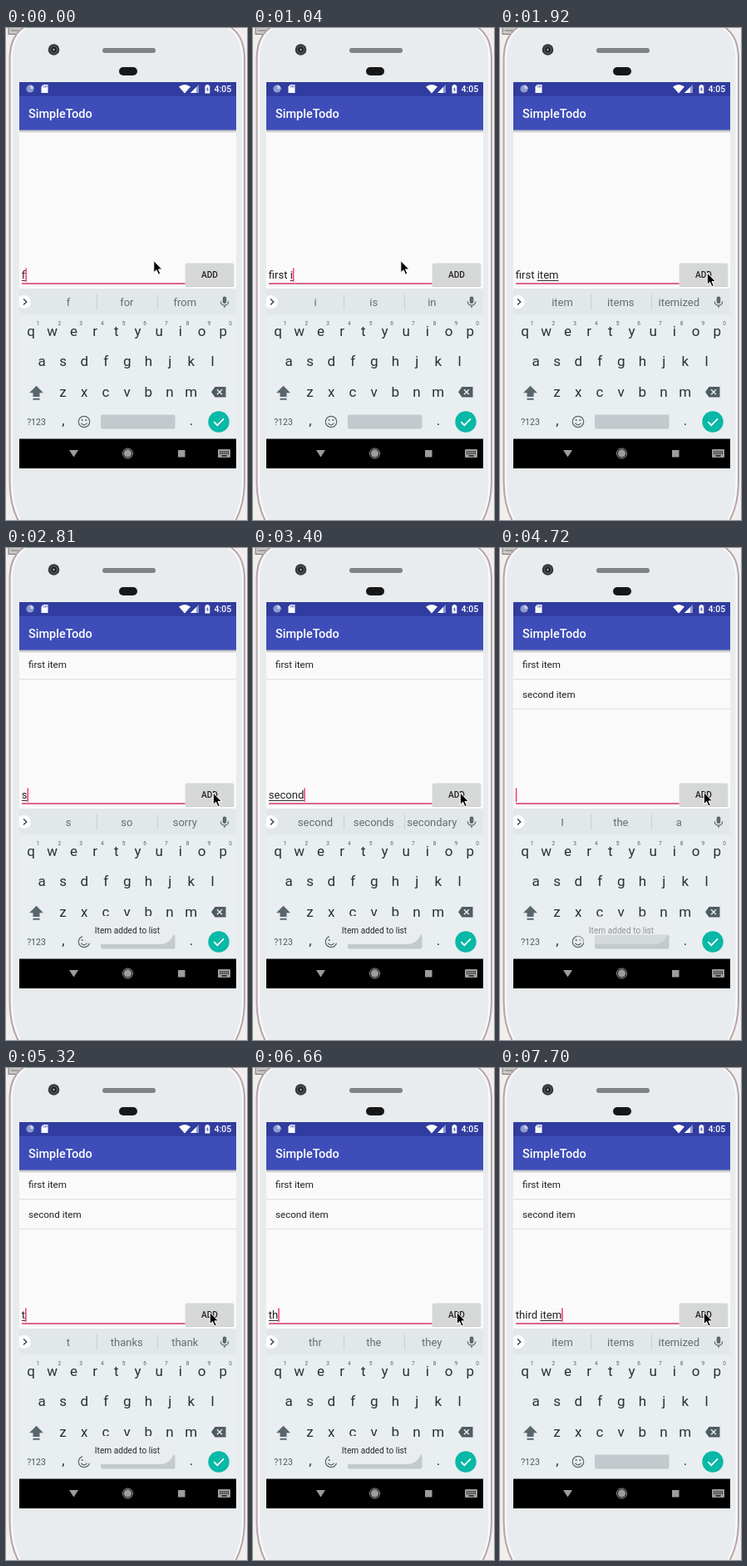
Recreate the animation shown at these times as an HTML page. Size 290 by 591 pixels, loop 7990 ms.

```html
<!DOCTYPE html>
<html lang="en">
<head>
<meta charset="utf-8">
<title>Todo list demo</title>
<style>
  html, body { margin: 0; width: 100%; height: 100%; overflow: hidden; background: #f3eeee; }
  svg { display: block; width: 290px; height: 591px; font-family: Roboto, sans-serif; }
  text { white-space: pre; }
  .mid { text-anchor: middle; }
  .key { font-size: 17px; fill: #263238; }
  .hint { font-size: 6.6px; fill: #56646b; }
  .sug { font-size: 13px; fill: #636e73; }
  .item { font-size: 11.6px; fill: #212121; }
</style>
</head>
<body>
<svg viewBox="0 0 290 591">
  <defs>
    <linearGradient id="shade" x1="0" y1="0" x2="0" y2="1">
      <stop offset="0" stop-color="#000" stop-opacity=".28"/>
      <stop offset="1" stop-color="#000" stop-opacity="0"/>
    </linearGradient>
  </defs>

  <!-- desktop and phone body -->
  <rect x="3" y="0" width="16" height="7.5" fill="#c9c6c6"/>
  <path d="M3 0V7.500H19V0M6 3H16" fill="none" stroke="#777272"/>
  <path d="M25.500 0V4" stroke="#5d4444" stroke-width="2"/>
  <path id="body" d="M25-3C13 4 5 14 4.500 36V545C4.500 566 8 580 16 594H275C283 580 287 566 287 545V36C286.500 14 279 4 267-3Z"
    fill="#e9ecee" stroke="#b5a5a8" stroke-width="2"/>
  <path d="M27-2C15 5 7.500 15 7 37V545C7 566 11 580 18 593M265-2C277 5 284 15 284.500 37V545C284.500 566 281 580 273 593"
    fill="none" stroke="#f8f8f9" stroke-width="2"/>
  <circle cx="57.500" cy="26" r="6.800" fill="#35383b"/>
  <circle cx="57.500" cy="26" r="4" fill="#191b1e" stroke="#666a6d"/>
  <circle cx="57.500" cy="26" r="1.500" fill="#8b9196"/>
  <rect x="116" y="24" width="64" height="6" rx="3" fill="#818385"/>
  <rect x="136" y="47" width="22" height="10" rx="5" fill="#171718"/>

  <!-- app -->
  <rect x="16" y="65" width="261" height="464" fill="#fafafa"/>
  <rect x="16" y="122.500" width="261" height="4" fill="url(#shade)"/>
  <rect x="16" y="65" width="261" height="17" fill="#303c9f"/>
  <rect x="16" y="82" width="261" height="40.600" fill="#3e4db8"/>
  <circle cx="29" cy="73" r="4.600" fill="#8f9bd0"/>
  <path d="M29 68.400A4.600 4.600 0 0 1 33.600 73H29Z" fill="#c3caea"/>
  <path d="M45 68H50.500V78H42.500V70.500Z" fill="#fff"/>
  <path d="M45.700 69V71.500M47.400 69V71.500M49 69V71.500" stroke="#303c9f" stroke-width=".7"/>
  <path d="M208 70.500Q215 65.500 222 70.500L215 78.500Z" fill="#fff"/>
  <path d="M232 68V78H222Z" fill="#8d97d0"/>
  <path d="M229 71V78H222Z" fill="#fff"/>
  <path d="M239.500 69.300H241V68H243.800V69.300H245.300V78.500H239.500Z" fill="#fff"/>
  <path d="M242.800 70.500L241 74H242.400V77L244 73.400H242.600Z" fill="#303c9f"/>
  <text x="250.500" y="77" font-size="10.600" font-weight="500" fill="#fff">4:05</text>
  <text x="27" y="108" font-size="14.500" font-weight="500" fill="#fff">SimpleTodo</text>

  <g id="row1" class="item">
    <text x="27" y="144.300">first item</text>
    <path d="M16 157.500H277" stroke="#dedede"/>
  </g>
  <g id="row2" class="item">
    <text x="27" y="179.800">second item</text>
    <path d="M16 193.300H277" stroke="#dedede"/>
  </g>

  <path d="M19 307H215.500" stroke="#d3326b" stroke-width="1.500"/>
  <text id="field" x="18.800" y="301.300" font-size="13.050" fill="#212121"></text>
  <rect id="line" y="303" height="1" fill="#333"/>
  <rect id="caret" y="288.500" width="1.500" height="16.500" fill="#f0377a"/>
  <rect x="215.700" y="283.500" width="58.600" height="27.500" rx="1.500" fill="#000" opacity=".18"/>
  <rect id="button" x="216" y="282.500" width="58" height="27.500" rx="1.500" fill="#d6d7d7"/>
  <text class="mid" x="245" y="300" font-size="10.150" font-weight="500" fill="#222">ADD</text>

  <!-- keyboard -->
  <rect x="16" y="313" width="261" height="181" fill="#e9eef0"/>
  <rect x="16" y="313" width="261" height="32" fill="#e2e7e9"/>
  <path d="M109.500 320V338M182.500 320V338" stroke="#cbd1d4"/>
  <path d="M16 323.400A8 8 0 1 1 16 334.600Z" fill="#fff"/>
  <path d="M21 325.500L24.700 329L21 332.500" fill="none" stroke="#37474f" stroke-width="1.500"/>
  <g id="sugs"></g>
  <rect x="260.700" y="322.500" width="4.600" height="8.500" rx="2.300" fill="#5b686e"/>
  <path d="M258.300 328.500A4.700 4.700 0 0 0 267.700 328.500M263 333V336" fill="none" stroke="#5b686e" stroke-width="1.300"/>
  <g id="keys"></g>
  <path d="M36.500 429.800L45 438.300H40.500V443H32.500V438.300H28Z M32.500 444.800H40.500V446.800H32.500Z" fill="#59676d"/>
  <path d="M251.500 431H264.500V443.500H251.500L247 437.250Z" fill="#4f5d63"/>
  <path d="M254 434.200L260 440.300M260 434.200L254 440.300" stroke="#e9eef0" stroke-width="1.400"/>
  <text class="mid" x="36.500" y="477" font-size="10.500" fill="#4c5a60">?123</text>
  <g fill="none" stroke="#59676d" stroke-width="1.200">
    <circle cx="94" cy="473" r="6.700"/>
    <path d="M90.500 474.700Q94 479 97.500 474.700"/>
  </g>
  <circle cx="91.700" cy="471" r="1.100" fill="#59676d"/>
  <circle cx="96.300" cy="471" r="1.100" fill="#59676d"/>
  <rect x="114" y="464.500" width="89.500" height="17" rx="2" fill="#c3c9cc"/>
  <circle cx="256" cy="473" r="12.700" fill="#09b8a6"/>
  <path d="M250.300 473.200L254.300 477.200L262 469.300" fill="none" stroke="#fff" stroke-width="1.800"/>

  <!-- navigation bar -->
  <rect x="16" y="493.500" width="261" height="35.500" fill="#000"/>
  <g fill="#9c9c9c">
    <path d="M76 507H87L81.500 515.500Z"/>
    <circle cx="146.500" cy="511" r="4.700"/>
    <circle cx="146.500" cy="511" r="6" fill="none" stroke="#9c9c9c"/>
    <rect x="207" y="507" width="8.500" height="8.500"/>
    <rect x="255" y="506" width="15" height="10" rx="1"/>
    <path d="M257 508.800H268.500M257 511.200H268.500" stroke="#000" stroke-width="1.200" stroke-dasharray="1.300 1.100"/>
    <path d="M259.500 513.900H265.500" stroke="#000" stroke-width="1.200"/>
  </g>

  <g id="toast">
    <rect x="90" y="442" width="112.500" height="34" rx="17" fill="#e9edee"/>
    <text class="mid" x="146" y="462.700" font-size="10.150" fill="#262b2d">Item added to list</text>
  </g>

  <path id="mouse" d="M0 0V14.200L3.300 11.200L5.600 16.600L8 15.600L5.700 10.400H10.200Z"
    fill="#000" stroke="#fff" stroke-width="1" stroke-linejoin="round"/>
</svg>
<script>
const LOOP = 7990;
const $ = id => document.getElementById(id);

function addText(parent, cls, x, y, str = '') {
  const el = document.createElementNS('http://www.w3.org/2000/svg', 'text');
  el.setAttribute('class', 'mid ' + cls);
  el.setAttribute('x', x);
  el.setAttribute('y', y);
  el.textContent = str;
  return parent.appendChild(el);
}

const PITCH = 25.7;
[['qwertyuiop', 30, 369.5], ['asdfghjkl', 43, 405.5], ['zxcvbnm', 68.5, 442.5]].forEach(([row, x0, y], r) => {
  [...row].forEach((ch, i) => {
    const x = x0 + i * PITCH;
    addText($('keys'), 'key', x, y, ch);
    if (!r) addText($('keys'), 'hint', x + 8.7, 357, (i + 1) % 10);
  });
});
addText($('keys'), 'key', 69, 477, ',');
addText($('keys'), 'key', 223, 477, '.');
const sugs = [75, 145.3, 215.3].map(x => addText($('sugs'), 'sug', x, 334));

// time, field text, suggestions
const typing = [
  [0, 'f', 'f for from'],
  [150, 'fi', 'fi first fine'],
  [300, 'fir', 'fir first fire'],
  [440, 'first', 'first firsts First'],
  [740, 'first ', 'time one of'],
  [1040, 'first i', 'i is in'],
  [1190, 'first it', 'it is its'],
  [1340, 'first item', 'item items itemized'],
  [2220, '', 'I the a'],
  [2660, 's', 's so sorry'],
  [2960, 'se', 'se see send'],
  [3100, 'sec', 'sec second secret'],
  [3250, 'secon', 'secon second seconds'],
  [3400, 'second', 'second seconds secondary'],
  [3550, 'second ', 'one time half'],
  [3690, 'second i', 'i is in'],
  [3840, 'second it', 'it is its'],
  [3980, 'second ite', 'ite item it'],
  [4130, 'second item', 'item items itemized'],
  [4430, '', 'I the a'],
  [5170, 't', 't thanks thank'],
  [5470, 'thr', 'thr the they'],
  [5620, 'thri', 'thri three thrift'],
  [5770, 'thrid', 'thrid third three'],
  [6370, 'thri', 'thri three thrift'],
  [6510, 'thr', 'thr the they'],
  [6660, 'th', 'thr the they'],
  [6810, 'thir', 'thir third think'],
  [6960, 'third', 'third thirds Third'],
  [7110, 'third ', 'time one party'],
  [7250, 'third i', 'i is in'],
  [7400, 'third it', 'it is its'],
  [7550, 'third ite', 'ite item it'],
  [7700, 'third item', 'item items itemized']
];
const mouse = [[0, 177.8, 279.5], [1630, 212, 298], [1770, 243, 308], [1920, 249.3, 294], [4430, 245.3, 293.5]];
const toast = [[0, 0], [2370, .45], [2510, 1], [4430, .5], [4580, 0], [4720, .45], [4870, 1], [6810, .5], [6960, 0]];
const press = [[0, '#d6d7d7'], [2220, '#c6c7c7'], [2510, '#d6d7d7'], [4430, '#c6c7c7'], [4720, '#d6d7d7']];

const at = (steps, t) => steps.findLast(s => s[0] <= t);
const show = (id, on) => $(id).style.visibility = on ? 'visible' : 'hidden';

function setField(str) {
  const field = $('field'), left = 18.8;
  field.textContent = str;
  const width = str ? field.getComputedTextLength() : 0;
  const start = str.lastIndexOf(' ') + 1;
  const before = start ? field.getSubStringLength(0, start) : 0;
  $('line').setAttribute('x', left + before);
  $('line').setAttribute('width', Math.max(0, width - before));
  $('caret').setAttribute('x', left + width);
}

function draw(t) {
  const [, str, words] = at(typing, t);
  setField(str);
  words.split(' ').forEach((w, i) => sugs[i].textContent = w);
  show('caret', t < 1920 || t >= 2220);
  show('row1', t >= 2220);
  show('row2', t >= 4430);
  $('toast').setAttribute('opacity', at(toast, t)[1]);
  $('button').setAttribute('fill', at(press, t)[1]);
  const [, x, y] = at(mouse, t);
  $('mouse').setAttribute('transform', `translate(${x} ${y})`);
}

const begin = performance.now();
function tick() {
  draw((performance.now() - begin) % LOOP);
  requestAnimationFrame(tick);
}
tick();
</script>
</body>
</html>
```
